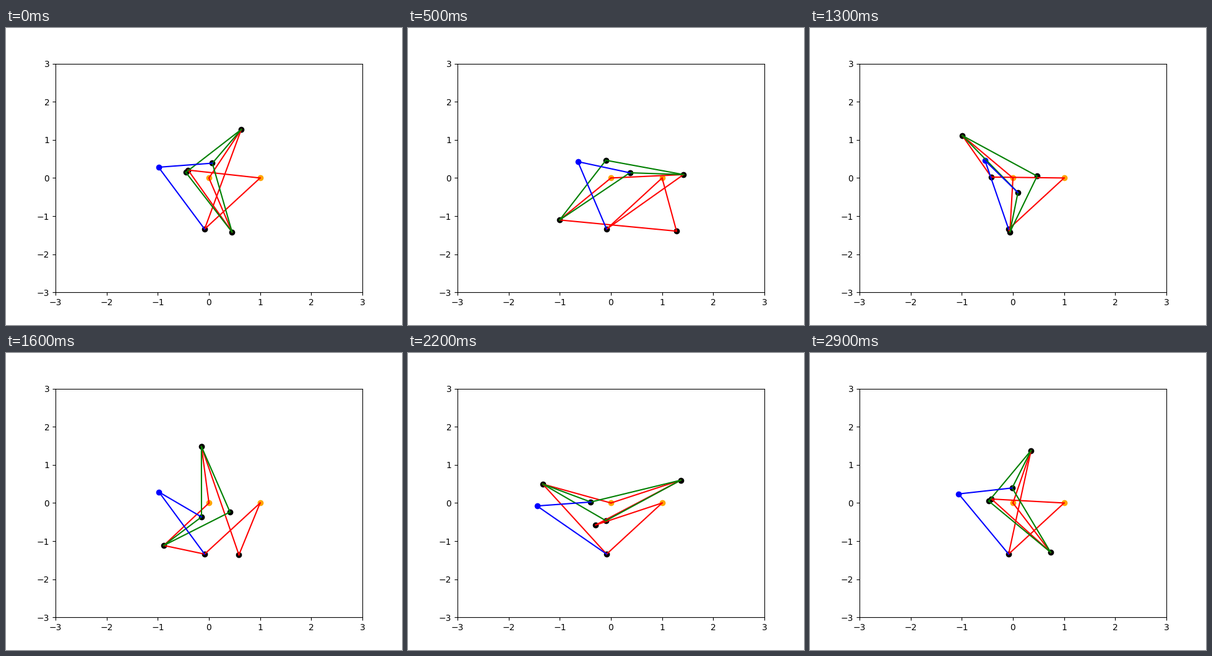
Animation, 640 px wide and 480 px high, one loop 3000 ms. Source, as a matplotlib script:

```python
import numpy as np
import matplotlib.pyplot as plt
from matplotlib.animation import FuncAnimation

FRAMES = 30
INTERVAL = 100

# Fixed points of the linkage
O = np.array([0.0, 0.0])
P = np.array([1.0, 0.0])
G = np.array([-0.085, -1.341])

# Radius and start angle (degrees) of the points turning about O
CRANK = {"A": (1.4225, 63.6), "B": (1.490, -72.33),
         "D": (0.475, 162.0), "E": (0.394, 80.3)}

LINKS = [("red", "OA"), ("red", "OB"), ("red", "AG"), ("red", "GP"),
         ("red", "BC"), ("red", "CP"),
         ("green", "AD"), ("green", "BD"), ("green", "AE"), ("green", "BE"),
         ("blue", "EF"), ("blue", "GF")]
DOTS = [("orange", "OP"), ("black", "ABCDEG"), ("blue", "F")]


def meet(p, rp, q, rq):
    """Both crossings of two circles, the one left of p->q first."""
    d = np.hypot(*(q - p))
    u = (q - p) / d
    a = (d * d + rp * rp - rq * rq) / (2 * d)
    h = np.sqrt(max(rp * rp - a * a, 0))
    n = np.array([-u[1], u[0]])
    return p + a * u + h * n, p + a * u - h * n


def pose(step):
    pts = {"O": O, "P": P, "G": G}
    for name, (r, start) in CRANK.items():
        t = np.radians(start - 360 * step / FRAMES)
        pts[name] = r * np.array([np.cos(t), np.sin(t)])
    # The crossing nearer to G wins, so this joint jumps twice a turn
    pts["C"] = min(meet(P, 1.4225, pts["A"], 1.490),
                   key=lambda c: np.hypot(*(c - G)))
    pts["F"] = meet(G, 1.856, pts["E"], 1.057)[0]
    return pts


fig, ax = plt.subplots(figsize=(6.4, 4.8), dpi=100)
ax.set_xlim(-3, 3)
ax.set_ylim(-3, 3)

parts = [(ax.plot([], [], "o", color=color)[0], names) for color, names in DOTS]
parts += [(ax.plot([], [], color=color)[0], names) for color, names in LINKS]


def draw(step):
    pts = pose(step)
    for artist, names in parts:
        artist.set_data(*np.transpose([pts[n] for n in names]))
    return [artist for artist, _ in parts]


anim = FuncAnimation(fig, draw, frames=FRAMES, interval=INTERVAL, repeat=True)
plt.show()
```
